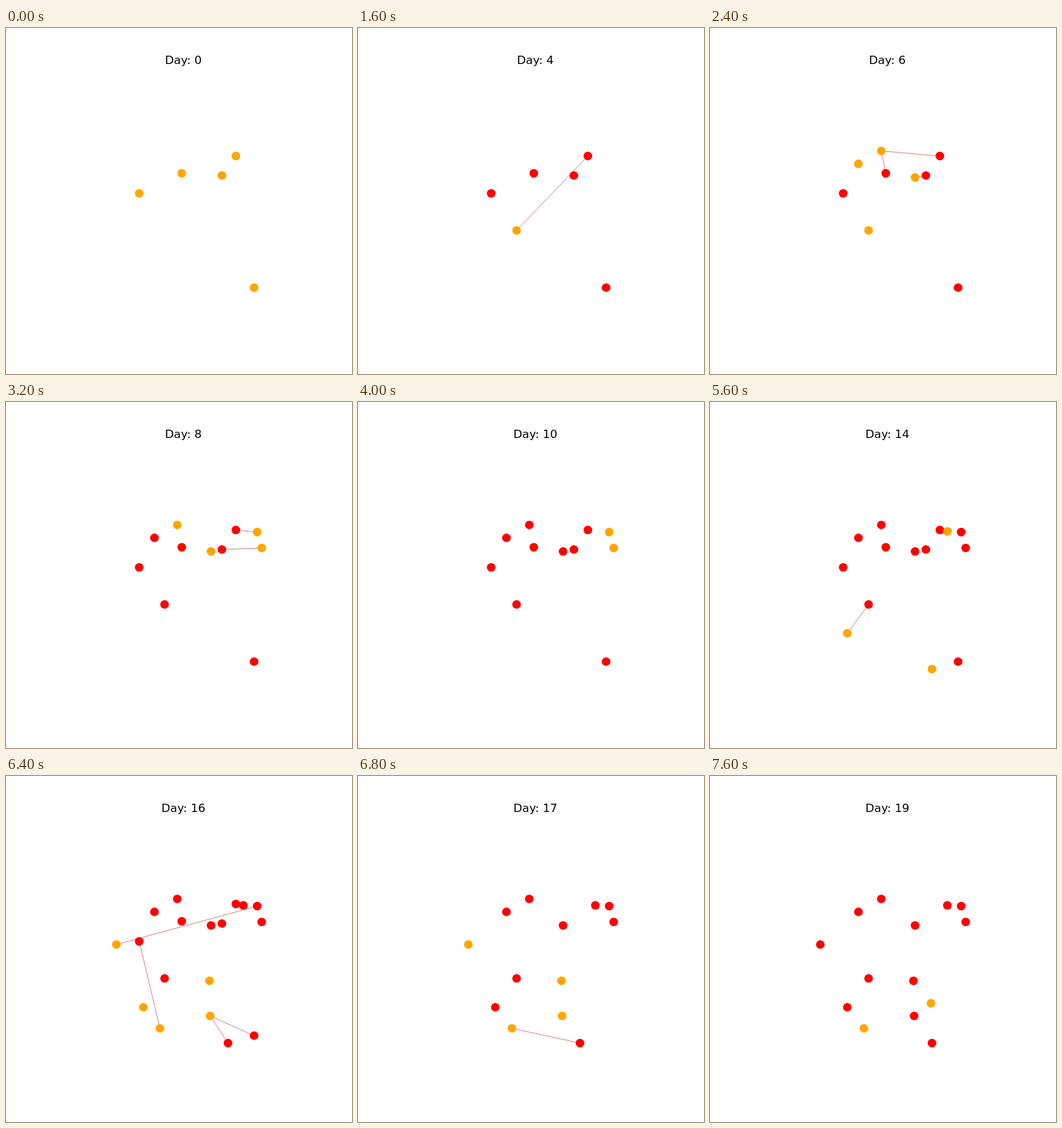
These frames come from a looping animation (500 px wide and 500 px high, 8 s). An HTML page with a canvas:

```html
<!DOCTYPE html>
<html lang="en">
<head>
<meta charset="utf-8">
<title>Contagion by day</title>
<style>
  html, body { margin: 0; width: 100%; height: 100%; overflow: hidden; background: #fff; }
  canvas { display: block; width: 500px; height: 500px; }
</style>
</head>
<body>
<canvas id="stage" width="500" height="500"></canvas>
<script>
const ctx = document.getElementById('stage').getContext('2d');
const DAY_MS = 400, DAYS = 20, RADIUS = 6.25;

// x, y, first day, day of symptoms, day of recovery
const person = (x, y, from, sick, gone = Infinity) => ({ x, y, from, sick, gone });
const people = {
  A: person(192.5, 239, 0, 3, 17),
  B: person(254, 210, 0, 3, 17),
  C: person(312, 213.2, 0, 3, 17),
  D: person(332.2, 185, 0, 3, 17),
  E: person(358.5, 375.2, 0, 3, 17),
  F: person(229.2, 292.6, 4, 7),
  G: person(214.5, 196.3, 5, 8),
  H: person(247.5, 177.7, 6, 10),
  I: person(296.4, 216, 6, 9),
  J: person(363, 188, 7, 11),
  K: person(369.5, 210.9, 8, 11),
  L: person(343, 187, 13, 16),
  M: person(198.5, 334.2, 14, 17),
  N: person(320.8, 386, 11, 15),
  O: person(159.4, 243.6, 16, 19),
  P: person(294.1, 296, 15, 18),
  Q: person(222.5, 364.7, 16, 20),
  R: person(295, 346.8, 16, 19),
  S: person(319.4, 328.4, 18, 21)
};

// contacts on each day, as pairs of people
const contacts = {
  4: 'FD', 5: 'GB', 6: 'HD HB IC', 7: 'JD HB', 8: 'KC JD', 11: 'NF', 13: 'LD',
  14: 'MF', 15: 'PF', 16: 'OJ QA RN RE', 17: 'QN', 18: 'SJ'
};

function drawContact([a, b]) {
  const p = people[a], q = people[b];
  ctx.beginPath();
  ctx.moveTo(p.x, p.y);
  ctx.lineTo(q.x, q.y);
  ctx.stroke();
}

function drawPerson(p, day) {
  if (day < p.from || day >= p.gone) return;
  ctx.fillStyle = day < p.sick ? '#ffa500' : '#ff0000';
  ctx.beginPath();
  ctx.arc(p.x, p.y, RADIUS, 0, Math.PI * 2);
  ctx.fill();
}

function draw(day) {
  ctx.fillStyle = '#fff';
  ctx.fillRect(0, 0, 500, 500);

  ctx.strokeStyle = 'rgba(200, 55, 50, 0.85)';
  ctx.lineWidth = 0.75;
  (contacts[day] || '').split(' ').filter(Boolean).forEach(drawContact);
  Object.values(people).forEach(p => drawPerson(p, day));

  ctx.fillStyle = '#000';
  ctx.font = '16.67px "DejaVu Sans", sans-serif';
  ctx.textAlign = 'center';
  ctx.fillText('Day: ' + day, 256.3, 52);
}

const start = performance.now();
function tick() {
  draw(Math.floor((performance.now() - start) / DAY_MS) % DAYS);
  requestAnimationFrame(tick);
}
tick();
</script>
</body>
</html>
```
